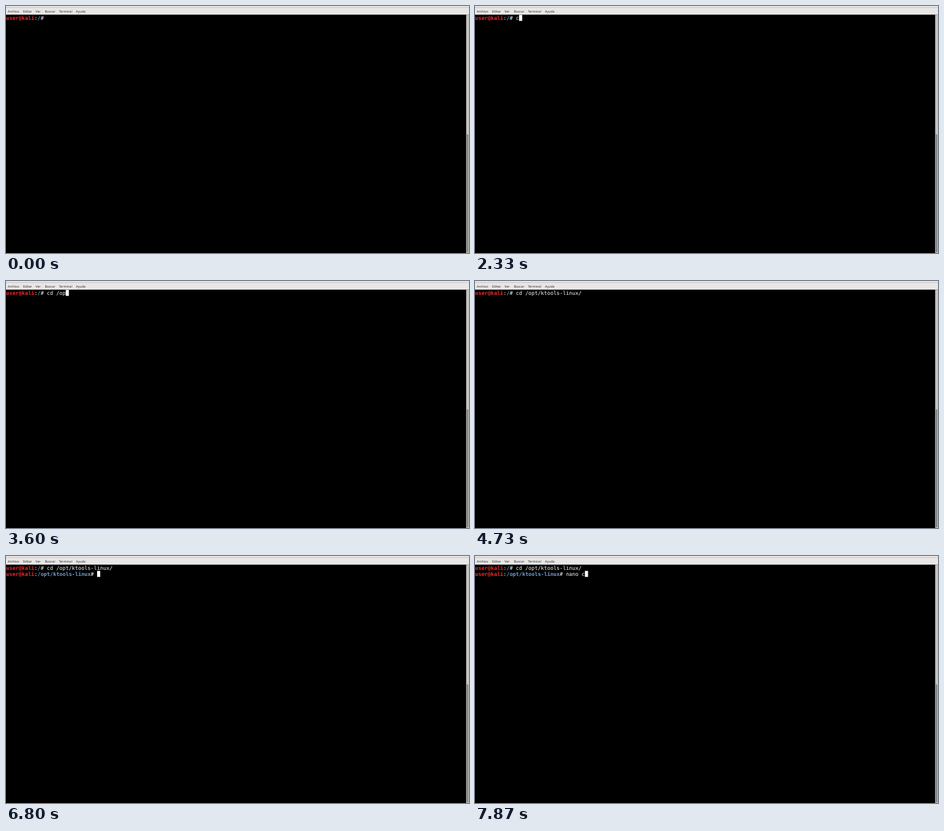
Animation of 768 by 410 pixels, one loop 8000 ms. Source, as an HTML page:

```html
<!DOCTYPE html>
<html lang="es">
<head>
<meta charset="utf-8">
<title>Terminal</title>
<style>
html, body { margin: 0; width: 100%; height: 100%; overflow: hidden; background: #000; }
svg { display: block; width: 768px; height: 410px; }
text { white-space: pre; text-rendering: geometricPrecision; }
.menu { font: 5.45px "Open Sans", "Noto Sans", sans-serif; fill: #222829; }
.line { font: 8.638px "DejaVu Sans Mono", monospace; fill: #fff; }
.user, .path { font-weight: bold; }
.user { fill: #ef2929; }
.path { fill: #729fcf; }
</style>
</head>
<body>
<svg viewBox="0 0 768 410">
  <rect width="768" height="410"/>
  <rect width="768" height="14.4" fill="#e8e7e6"/>
  <rect y="2.3" width="768" height="0.8" fill="#bfbdbb"/>
  <text class="menu" y="10.6"><tspan x="3">Archivo</tspan><tspan x="28.2">Editar</tspan><tspan x="49">Ver</tspan><tspan x="64.4">Buscar</tspan><tspan x="87.7">Terminal</tspan><tspan x="116">Ayuda</tspan></text>
  <rect x="763.3" y="14.4" width="4.7" height="395.6" fill="#c5c4c2"/>
  <rect x="764.4" y="213" width="2.5" height="196" rx="1" fill="#7e8182"/>
  <rect id="cursor" width="5.2" height="10" fill="#fff"/>
  <g id="screen"></g>
</svg>
<script>
const LOOP = 8000, BLINK = 600, CHAR = 5.2, ROW = 10, LEFT = 0.3, TOP = 14.7, BASELINE = 8.1;
const dirs = ['/', '/opt/ktools-linux'];
const cursor = document.getElementById('cursor');

// A run of evenly spaced keystrokes; a longer piece is a tab completion.
const burst = (start, step, ...pieces) => pieces.map((text, i) => ({ at: start + i * step, text }));
const strokes = [
  burst(140, 0, ''),
  burst(2200, 200, 'c', 'd', ' ', '/'),
  burst(3470, 130, 'o', 'p', 't/'),
  burst(4000, 200, 'k', 'tools-linux/'),
  burst(5600, 0, '\n'),
  burst(7130, 115, 'n', 'a', 'n', 'o'),
  burst(7670, 200, ' ', 'c')
].flat();

document.getElementById('screen').innerHTML = dirs.map((dir, i) =>
  `<text class="line" x="${LEFT}" y="${TOP + BASELINE + i * ROW}"><tspan class="user">user@kali</tspan>:` +
  `<tspan class="path">${dir}</tspan># <tspan class="input"></tspan></text>`).join('');
const rows = [...document.querySelectorAll('.line')];

function draw() {
  const t = performance.now() % LOOP;
  const done = strokes.filter(s => s.at <= t);
  const inputs = done.map(s => s.text).join('').split('\n');
  rows.forEach((row, i) => {
    row.style.display = i < inputs.length ? '' : 'none';
    row.querySelector('.input').textContent = inputs[i] || '';
  });

  // Each keystroke restarts the blink.
  const last = (done.at(-1) || strokes[0]).at;
  const lit = Math.floor((t - last + 70) / BLINK) % 2 === 0;
  const current = inputs.length - 1;
  cursor.setAttribute('x', LEFT + CHAR * rows[current].textContent.length);
  cursor.setAttribute('y', TOP + ROW * current);
  cursor.style.display = lit ? '' : 'none';
  requestAnimationFrame(draw);
}
draw();
</script>
</body>
</html>
```
